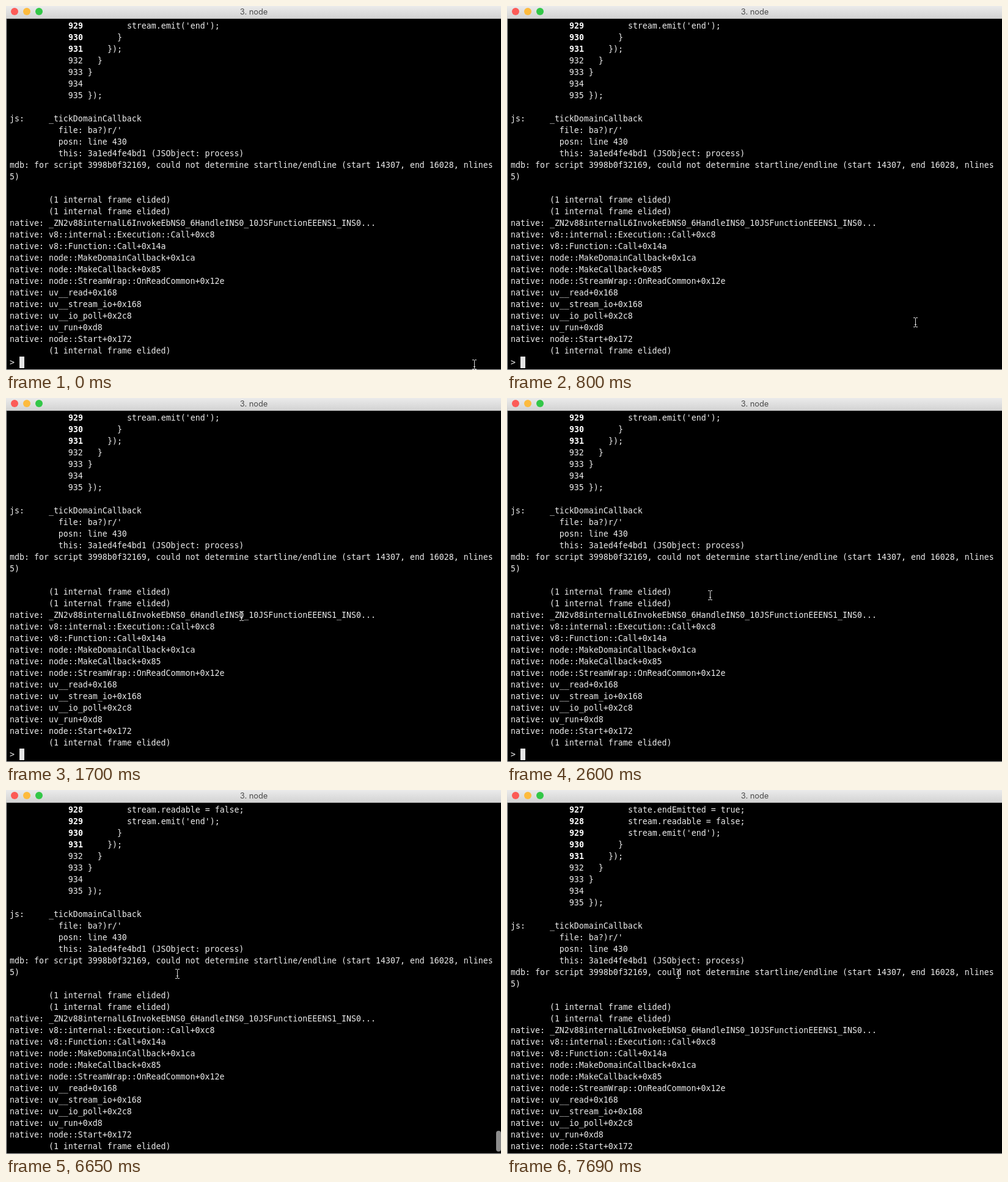
These frames come from a looping animation (810 px wide and 596 px high, 8 s). An HTML page with a canvas:

```html
<!DOCTYPE html>
<html lang="en">
<head>
<meta charset="utf-8">
<title>Terminal</title>
<style>
  html, body { margin: 0; width: 100%; height: 100%; overflow: hidden; background: #000; }
  canvas { display: block; }
</style>
</head>
<body>
<canvas id="stage" width="810" height="596"></canvas>
<script>
const ctx = document.getElementById('stage').getContext('2d');
const W = 810, H = 596, LOOP = 8000;
const CELL = 8, ROW = 19, LEFT = 6, TOP = 23, ROWS = 30;
const MONO = '13.288px "DejaVu Sans Mono", monospace';

const pad = n => ' '.repeat(n);
const code = (number, indent, text) => pad(12) + number + pad(indent + 1) + text;
const frame = text => 'native: ' + text;
const elided = pad(8) + '(1 internal frame elided)';

const lines = [
  code(927, 8, 'state.endEmitted = true;'),
  code(928, 8, 'stream.readable = false;'),
  code(929, 8, "stream.emit('end');"),
  code(930, 6, '}'),
  code(931, 4, '});'),
  code(932, 2, '}'),
  code(933, 0, '}'),
  code(934, 0, ''),
  code(935, 0, '});'),
  '',
  'js:     _tickDomainCallback',
  pad(10) + "file: ba?)r/'",
  pad(10) + 'posn: line 430',
  pad(10) + 'this: 3a1ed4fe4bd1 (JSObject: process)',
  'mdb: for script 3998b0f32169, could not determine startline/endline (start 14307, end 16028, nlines',
  '5)',
  '',
  elided,
  elided,
  frame('_ZN2v88internalL6InvokeEbNS0_6HandleINS0_10JSFunctionEEENS1_INS0...'),
  frame('v8::internal::Execution::Call+0xc8'),
  frame('v8::Function::Call+0x14a'),
  frame('node::MakeDomainCallback+0x1ca'),
  frame('node::MakeCallback+0x85'),
  frame('node::StreamWrap::OnReadCommon+0x12e'),
  frame('uv__read+0x168'),
  frame('uv__stream_io+0x168'),
  frame('uv__io_poll+0x2c8'),
  frame('uv_run+0xd8'),
  frame('node::Start+0x172'),
  elided,
  '>'
];
const BOLD_LINES = 5;

// Each step: start time, then the values held until the next step.
const pointerSteps = [
  [0, 763, 579], [500, 746, 567], [650, 668, 513], [800, 665, 510],
  [1100, 596, 462], [1250, 477, 399], [1550, 431, 371], [1700, 382, 349],
  [2600, 329, 315], [2750, 277, 293]
];
const scrollSteps = [[0, 2], [6650, 1], [6940, 0]];
const thumbSteps = [[0, 0, 0], [6650, 558, 1], [6940, 557, 1], [7540, 557, 0.5], [7690, 0, 0]];

function at(steps, t) {
  let held = steps[0];
  for (const step of steps) if (t >= step[0]) held = step;
  return held.slice(1);
}

function rect(x, y, w, h, color) {
  ctx.fillStyle = color;
  ctx.fillRect(x, y, w, h);
}

function drawTitleBar() {
  const shade = ctx.createLinearGradient(0, 0, 0, 20);
  shade.addColorStop(0, '#ebebeb');
  shade.addColorStop(1, '#d3d3d3');
  rect(0, 0, W, 20, shade);
  rect(0, 20, W, 1, '#b4b4b4');
  ['#fc5b57', '#fdbb3e', '#33c748'].forEach((color, i) => {
    ctx.fillStyle = color;
    ctx.beginPath();
    ctx.arc(14 + 20 * i, 9, 6, 0, Math.PI * 2);
    ctx.fill();
  });
  ctx.font = '12.8px Inter, sans-serif';
  ctx.textAlign = 'center';
  ctx.fillStyle = '#4a4a4a';
  ctx.fillText('3. node', 405.5, 14);
  ctx.textAlign = 'left';
}

function drawText(first) {
  for (let row = 0; row < ROWS; row++) {
    const index = first + row;
    const text = lines[index];
    const y = TOP + row * ROW + 14;
    ctx.font = MONO;
    ctx.fillStyle = '#ececec';
    if (index < BOLD_LINES) {
      ctx.fillText(text.slice(16), LEFT + 16 * CELL, y);
      ctx.font = 'bold ' + MONO;
      ctx.fillStyle = '#fff';
      ctx.fillText(text.slice(12, 15), LEFT + 12 * CELL, y);
    } else {
      ctx.fillText(text, LEFT, y);
    }
    if (index === lines.length - 1) {
      rect(LEFT + 2 * CELL, TOP + row * ROW, CELL, ROW, '#e4e4e4');
    }
  }
}

function drawThumb(y, alpha) {
  if (!alpha) return;
  ctx.globalAlpha = alpha;
  ctx.fillStyle = '#8c8c8c';
  ctx.beginPath();
  ctx.roundRect(802, y, 8, 34, 4);
  ctx.fill();
  ctx.globalAlpha = 1;
}

function drawPointer(x, y) {
  const color = '#dedede';
  for (const dy of [0, 15]) {
    rect(x, y + dy, 3, 1, color);
    rect(x + 4, y + dy, 3, 1, color);
  }
  rect(x + 3, y + 1, 1, 14, color);
  rect(x + 2, y + 11, 3, 1, color);
}

function draw(t) {
  rect(0, 0, W, H, '#000');
  drawTitleBar();
  rect(0, 21, 1, H - 21, '#bdbdbd');
  rect(0, H - 1, W, 1, '#bdbdbd');
  drawText(...at(scrollSteps, t));
  drawThumb(...at(thumbSteps, t));
  drawPointer(...at(pointerSteps, t));
}

const start = performance.now();
function tick() {
  draw((performance.now() - start) % LOOP);
  requestAnimationFrame(tick);
}
tick();
</script>
</body>
</html>
```
